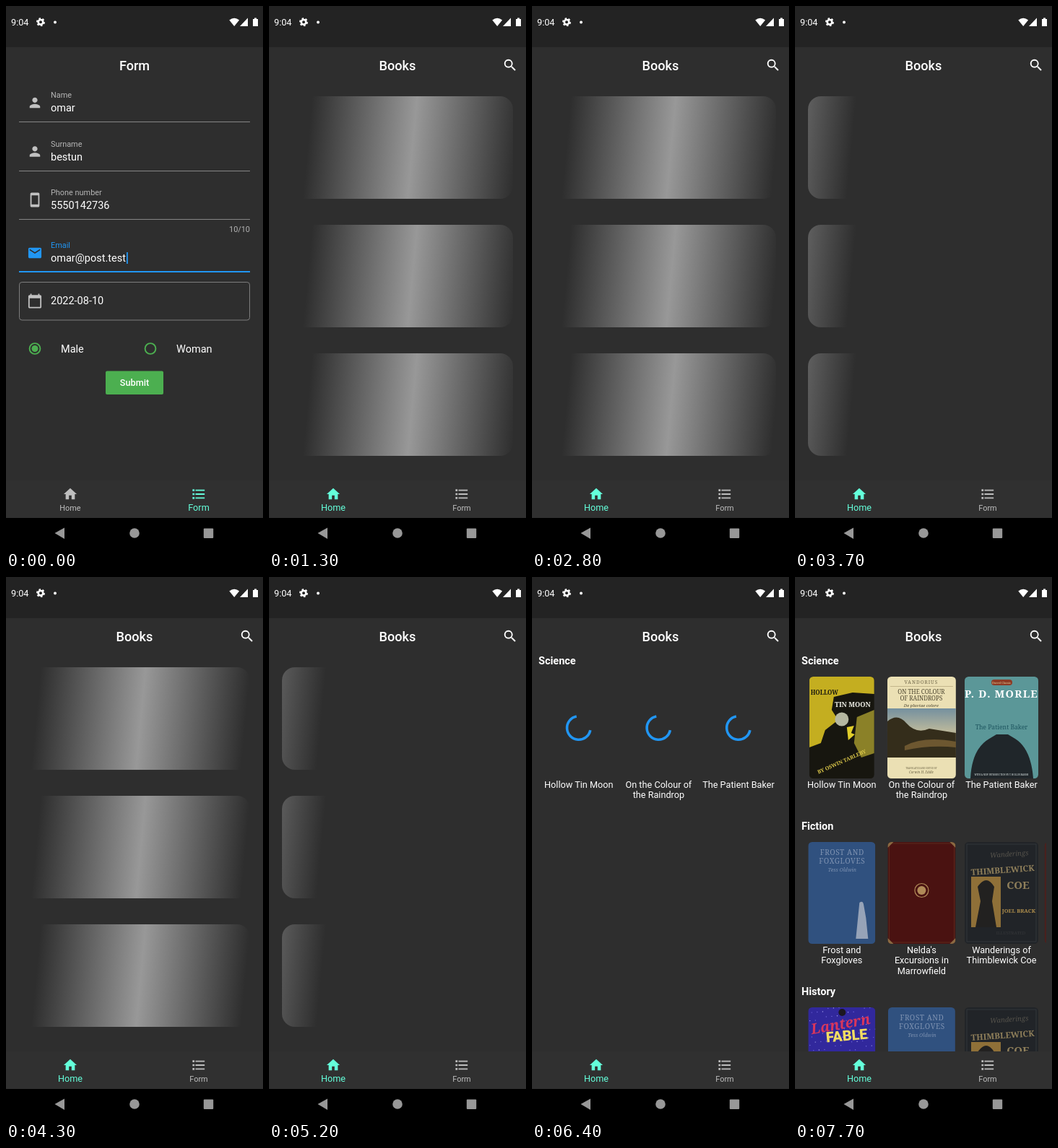
An HTML page that plays this animation: 356 px wide and 752 px high, repeating every 8000 ms.

```html
<!DOCTYPE html>
<html lang="en">
<head>
<meta charset="utf-8">
<title>Books and form</title>
<style>
  html, body { margin: 0; height: 100%; overflow: hidden; background: #2e2e2e; }
  svg { display: block; }
  text { font-family: Roboto, sans-serif; white-space: pre; }
  .serif { font-family: "Noto Serif", "Liberation Serif", serif; }
</style>
</head>
<body>
<svg id="stage" width="356" height="752" viewBox="0 0 356 752"></svg>
<script>
const LOOP = 8000, SWITCH = 400, SHIMMER = 495, SCIENCE = 6050, REST = 6600;
const ICONS = {
  person: 'M12 12c2.21 0 4-1.79 4-4s-1.79-4-4-4-4 1.79-4 4 1.79 4 4 4zm0 2c-2.67 0-8 1.34-8 4v2h16v-2c0-2.66-5.33-4-8-4z',
  phone: 'M17 1H7c-1.1 0-2 .9-2 2v18c0 1.1.9 2 2 2h10c1.1 0 2-.9 2-2V3c0-1.1-.9-2-2-2zm0 18H7V5h10z',
  mail: 'M20 4H4c-1.1 0-2 .9-2 2v12c0 1.1.9 2 2 2h16c1.1 0 2-.9 2-2V6c0-1.1-.9-2-2-2zm0 4l-8 5-8-5V6l8 5 8-5z',
  date: 'M20 3h-1V1h-2v2H7V1H5v2H4c-1.1 0-2 .9-2 2v16c0 1.1.9 2 2 2h16c1.1 0 2-.9 2-2V5c0-1.1-.9-2-2-2zm0 18H4V8h16z',
  home: 'M10 20v-6h4v6h5v-8h3L12 3 2 12h3v8z',
  list: 'M2.5 4.5h3v3h-3zm0 6h3v3h-3zm0 6h3v3h-3zM7 19h14v-2H7zm0-6h14v-2H7zm0-8v2h14V5z',
  search: 'M15.5 14h-.8l-.3-.3A6.5 6.5 0 1 0 13.7 14.4l.3.3v.8l5 5 1.5-1.5zm-6 0a4.5 4.5 0 1 1 0-9 4.5 4.5 0 0 1 0 9z'
};

const text = (x, y, s, size = 14.5, fill = '#fff', more = '') =>
  `<text x="${x}" y="${y}" font-size="${size}" fill="${fill}" ${more}>${s}</text>`;
const mid = (x, y, s, size, fill, more = '') => text(x, y, s, size, fill, 'text-anchor="middle" ' + more);
const serif = (x, y, s, size, fill, more = '') => mid(x, y, s, size, fill, 'class="serif" ' + more);
const box = (x, y, w, h, fill, more = '') =>
  `<rect x="${x}" y="${y}" width="${w}" height="${h}" fill="${fill}" ${more}/>`;
const path = (d, fill, more = '') => `<path d="${d}" fill="${fill}" ${more}/>`;
const disc = (x, y, r, fill, more = '') => `<circle cx="${x}" cy="${y}" r="${r}" fill="${fill}" ${more}/>`;
const icon = (name, x, y, fill = '#c1c1c1', more = '') =>
  path(ICONS[name], fill, `${more} transform="translate(${x} ${y}) scale(.907) translate(-12 -12)"`);

function field(y, label, value, name, active) {
  const blue = '#2196f3';
  return icon(name, 40, y, active ? blue : undefined) +
    text(62, y - 7, label, 10.9, active ? blue : '#b5b5b5') + text(62, y + 12, value) +
    (active ? box(18, y + 25, 320, 2, blue) : box(18, Math.round(y + 26), 320, 1, '#858585'));
}

const radio = (x, label, on) =>
  disc(x, 474.5, 7.4, 'none', 'stroke="#4caf50" stroke-width="1.9"') +
  (on ? disc(x, 474.5, 4.5, '#4caf50') : '') + text(x + 36, 479.5, label);

const form = () =>
  mid(178, 89, 'Form', 18.1, '#fff', 'font-weight="500"') +
  field(134, 'Name', 'omar', 'person') + field(201.5, 'Surname', 'bestun', 'person') +
  field(268.5, 'Phone number', '5550142736', 'phone') +
  text(338, 313, '10/10', 10.9, '#b5b5b5', 'text-anchor="end"') +
  field(342, 'Email', 'omar@post.test', 'mail', true) + box(167, 341, 1.8, 16, '#2196f3') +
  box(18.5, 382.5, 319, 52.5, 'none', 'rx="3.6" stroke="#7d7d7d"') +
  icon('date', 40, 408.5) + text(62, 413, '2022-08-10') +
  radio(40, 'Male', true) + radio(200, 'Woman') +
  box(138, 505.5, 80, 32.5, '#4caf50', 'rx="2"') +
  mid(178, 526, 'Submit', 12.7, '#fff', 'font-weight="500"');

const status = () =>
  box(0, 0, 356, 57, '#232323') + text(7, 27, '9:04', 12.7) +
  disc(48, 22.3, 3.3, 'none', 'stroke="#fff" stroke-width="2.6"') +
  disc(48, 22.3, 5, 'none', 'stroke="#fff" stroke-width="2" pathLength="12" stroke-dasharray="1"') +
  disc(68, 22.5, 2, '#fff') +
  path('M316.2 28L309.3 19.4Q316.2 14 323.1 19.4Z', '#fff') +
  path('M335 16.5V28H324Z', '#fff') + path('M342 18h2v-1.5h3V18h2V28h-7z', '#fff');

const navBar = () =>
  box(0, 657, 356, 52, '#303030') +
  icon('home', 89, 676, '#fff', 'class="tabIcon"') + mid(89, 698.5, 'Home', 11, '#fff', 'class="tabLabel"') +
  icon('list', 267, 676, '#fff', 'class="tabIcon"') + mid(267, 698.5, 'Form', 11, '#fff', 'class="tabLabel"') +
  box(0, 709, 356, 43, '#000') +
  path('M67.5 730L81 722.5V738Z', '#989898') + disc(178, 730, 6.8, '#989898') +
  box(273.8, 723.5, 13.4, 13.4, '#989898', 'rx="1"');

// Covers are drawn in a box 141 high, starting at 0,0.
const covers = {
  moon: () => box(0, 0, 90, 141, '#17160f') +
    path('M0 0H90V24L60 22 34 28 31 46 40 60 22 74 16 92 0 98Z', '#c4ae20') +
    path('M66 56L90 46V106L72 112 62 92Z', '#8b8128') + disc(45, 59, 9.5, '#b5b7a0') +
    path('M52 70L62 68 58 78 63 80 54 88Z', '#e0cd2a') +
    serif(21, 25, 'HOLLOW', 8, '#15150f', 'font-weight="700"') +
    serif(60, 42, 'TIN MOON', 9.2, '#f2f2ea', 'font-weight="700"') +
    serif(0, 0, 'BY OSWIN TARLEBY', 7.2, '#dcc84a', 'font-weight="700" transform="translate(46 120) rotate(-24)"'),
  rain: () => box(0, 0, 95, 141, '#ebe0b4') +
    serif(47, 10, 'VANDORIUS', 6.5, '#6d6447', 'letter-spacing="1"') + box(4, 13, 87, .6, '#a89b70') +
    serif(47, 24, 'ON THE COLOUR', 8, '#4c4530') + serif(47, 33, 'OF RAINDROPS', 8, '#4c4530') +
    serif(47, 41.5, 'De pluviae colore', 6, '#4c4530', 'font-style="italic"') +
    box(0, 44, 95, 68, 'url(#dusk)') +
    path('M0 62Q14 50 26 64 40 80 58 72L95 78V112H0Z', '#342d1b') +
    path('M24 96Q50 82 95 90V98Q60 94 24 102Z', '#6d5730') +
    serif(47, 128, 'TRANSLATED AND EDITED BY', 3, '#6d6447') +
    serif(47, 134, 'Corwin H. Eddle', 4.5, '#6d6447', 'font-style="italic"'),
  baker: () => box(0, 0, 102, 141, '#5b9798') + box(37, 4, 29, 8, '#8d3b25', 'rx="4"') +
    serif(51, 10, 'Dorrel Classic', 4, '#e8d9a0') +
    serif(51, 29, 'P. D. MORLE', 14.5, '#fff', 'font-weight="700" letter-spacing="1.2"') +
    serif(51, 73, 'The Patient Baker', 8.6, '#1f5660') +
    path('M8 141Q10 100 34 86L44 80H60L70 86Q92 100 95 141Z', '#20262a') +
    serif(51, 137, 'WITH A NEW INTRODUCTION BY T. HOLLIN MARSH', 3, '#e6efee'),
  frost: () => box(0, 0, 93, 141, '#30517f') +
    serif(47, 18, 'FROST AND', 10, '#7f93b2', 'letter-spacing=".6"') +
    serif(47, 30, 'FOXGLOVES', 10, '#7f93b2', 'letter-spacing=".6"') +
    serif(47, 41, 'Tess Oldwin', 7, '#7f93b2', 'font-style="italic"') +
    path('M71 84Q76 80 77 88L80 105 83 134H66L69 104Z', '#96a3b8'),
  maroon: () => box(0, 0, 94, 141, '#4a1211') +
    box(2, 2, 90, 137, 'none', 'stroke="#5f3020" stroke-width=".8"') +
    path('M0 0H8L0 8ZM94 0V8L86 0ZM0 141V133L8 141ZM94 141H86L94 133Z', '#8a6a42') +
    disc(47, 67, 9.5, 'none', 'stroke="#b08a58" stroke-width="1.2"') + disc(47, 67, 6, '#b08a58'),
  coe: () => box(0, 0, 102, 141, '#212428') +
    box(3, 3, 96, 135, 'none', 'stroke="#33363b" stroke-width="1"') +
    serif(62, 20, 'Wanderings', 9.5, '#55524b', 'font-style="italic" transform="rotate(-4 62 20)"') +
    serif(53, 43, 'THIMBLEWICK', 11.5, '#8f7f5a', 'font-weight="700" transform="rotate(-4 53 43)"') +
    serif(74, 65, 'COE', 15, '#8f7f5a', 'font-weight="700"') +
    box(9, 48, 41, 70, '#8f7038') + path('M15 118L22 82 18 62Q30 44 41 62L38 82 44 118Z', '#222120') +
    serif(75, 98, 'JOEL BRACK', 7.4, '#b08f4c', 'font-weight="700"') +
    serif(64, 128, 'ILLUSTRATED', 6, '#36383b'),
  fable: () => {
    let stars = '';
    for (let i = 0; i < 60; i++) stars += disc(i * 37.7 % 93, i * 23.3 % 64, .7, i % 3 ? '#6f66dc' : '#a9a4f0');
    return box(0, 0, 93, 141, '#31289c') + stars + disc(47, 7, 5, '#1c1720') +
      serif(46, 30, 'Lantern', 20, '#d9365c', 'font-weight="700" font-style="italic" transform="rotate(-10 46 30)"') +
      mid(54, 46, 'FABLE', 20, '#f1dc62', 'font-weight="900" transform="rotate(-5 54 46)"');
  },
  edge: () => box(0, 0, 102, 141, '#4a211e')
};

const rows = [
  ['Science', ['moon', 90, 'Hollow Tin Moon'], ['rain', 95, 'On the Colour of|the Raindrop'], ['baker', 102, 'The Patient Baker']],
  ['Fiction', ['frost', 93, 'Frost and|Foxgloves'], ['maroon', 94, "Nelda's|Excursions in|Marrowfield"],
    ['coe', 102, 'Wanderings of|Thimblewick Coe'], ['edge', 102, '']],
  ['History', ['fable', 93, ''], ['frost', 93, ''], ['coe', 102, '']]
];

function shelf([name, ...books], r) {
  const cells = books.map(([cover, w, title], c) => {
    const x = 64.8 + c * 110.6;
    const lines = title.split('|').map((s, i) => mid(x, 291.5 + i * 14.7, s, 12.7, '#fff')).join('');
    return lines + path('', 'none', `class="spin" data-row="${r}" stroke="#2196f3" stroke-width="3.6" transform="translate(${x} 209)"`) +
      `<g class="cover" data-at="${7000 + 85 * (r * 3 + Math.min(c, 2))}" transform="translate(${x - w / 2} 138)">` +
      `<g clip-path="url(#w${w})">${covers[cover]()}</g></g>`;
  }).join('');
  return `<g class="shelf" transform="translate(0 ${r * 229})">${text(9, 121, name, 14.5, '#fff', 'font-weight="700"')}${cells}</g>`;
}

const stop = (at, color) => `<stop offset="${at}" stop-color="${color}"/>`;
const stage = document.getElementById('stage');
stage.innerHTML = `<defs>
  <linearGradient id="glow" gradientUnits="userSpaceOnUse" x1="-480" y1="151" x2="480" y2="241">
    ${stop(.35, '#2e2e2e')}${stop(.5, '#989898')}${stop(.65, '#2e2e2e')}</linearGradient>
  <linearGradient id="dusk" x2="0" y2="1">${stop(0, '#74909f')}${stop(.45, '#b9b79c')}${stop(1, '#3a301c')}</linearGradient>
  <clipPath id="list">${box(0, 100, 348, 557, '#000')}</clipPath>
  ${[90, 93, 94, 95, 102].map(w => `<clipPath id="w${w}">${box(0, 0, w, 141, '#000', 'rx="5.5"')}</clipPath>`).join('')}
  </defs>${box(0, 0, 356, 752, '#2e2e2e')}${status()}
  <g id="form">${form()}</g>
  <g id="books">${mid(178, 89, 'Books', 18.1, '#fff', 'font-weight="500"')}${icon('search', 334, 82, '#fff')}
    <g id="cards">${[0, 178, 356].map(y => box(18, 125, 320, 142, 'url(#glow)', `rx="18" transform="translate(0 ${y})"`)).join('')}</g>
    <g clip-path="url(#list)">${rows.map(shelf).join('')}</g></g>${navBar()}`;

const $ = id => document.getElementById(id);
const all = name => [...document.getElementsByClassName(name)];
const [icons, labels, shelves, spinners, images] = ['tabIcon', 'tabLabel', 'shelf', 'spin', 'cover'].map(all);
const show = (el, on) => el.style.display = on ? '' : 'none';
const clamp = v => Math.min(1, Math.max(0, v));

// cubic-bezier(.4, 0, .2, 1)
function ease(x) {
  let lo = 0, hi = 1;
  for (let i = 0; i < 20; i++) {
    const s = (lo + hi) / 2, q = 1 - s;
    if (1.2 * q * q * s + .6 * q * s * s + s ** 3 < x) lo = s; else hi = s;
  }
  return 3 * (1 - lo) * lo * lo + lo ** 3;
}

function arc(t) {
  const p = t / 1333 % 1, turn = Math.PI * 1.5;
  const head = ease(clamp(p * 2)) * turn, tail = ease(clamp(p * 2 - 1)) * turn;
  const a = -Math.PI / 2 + tail + t / 2222 * 2 * Math.PI + p * Math.PI / 2;
  const sweep = Math.max(head - tail, .01);
  const at = v => `${16.3 * Math.cos(v)} ${16.3 * Math.sin(v)}`;
  return `M${at(a)}A16.3 16.3 0 ${sweep > Math.PI ? 1 : 0} 1 ${at(a + sweep)}`;
}

function draw(t) {
  show($('form'), t < SWITCH);
  show($('books'), t >= SWITCH);
  show($('cards'), t < SCIENCE);

  const home = ease(clamp((t - SWITCH) / 200));
  [home, 1 - home].forEach((k, i) => {
    const color = `rgb(${190 - 90 * k},${190 + 65 * k},${190 + 28 * k})`;
    icons[i].setAttribute('fill', color);
    labels[i].setAttribute('fill', color);
    labels[i].setAttribute('font-size', 10.9 + 1.8 * k);
  });

  const phase = Math.max(0, t - SHIMMER) / 1514 % 1;
  $('glow').setAttribute('gradientTransform', `translate(${640 * phase - 142} 0)`);

  shelves.forEach((el, r) => show(el, t >= (r ? REST : SCIENCE)));
  spinners.forEach((el, i) => {
    const start = +el.dataset.row ? REST : SCIENCE - 90;
    const loading = t < images[i].dataset.at;
    show(el, loading);
    show(images[i], !loading);
    if (loading && t >= start) el.setAttribute('d', arc(t - start));
  });
}

const begin = performance.now();
function tick() {
  draw((performance.now() - begin) % LOOP);
  requestAnimationFrame(tick);
}
tick();
</script>
</body>
</html>
```
